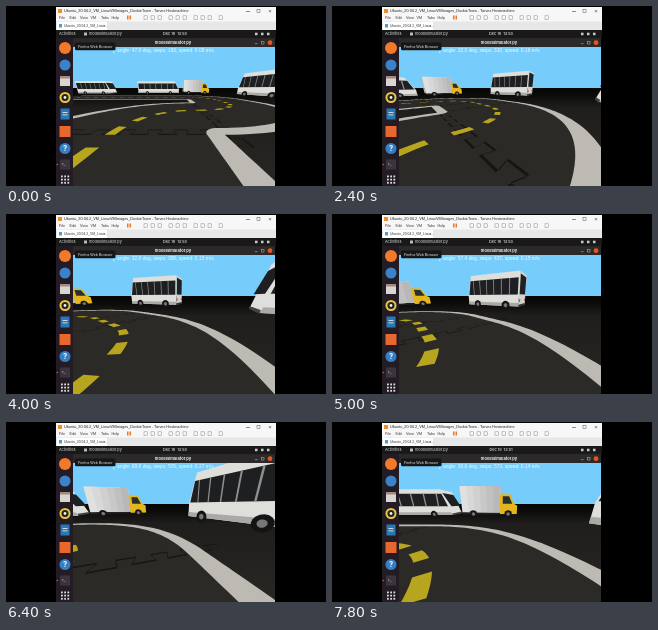
These frames come from a looping animation (320 px wide and 180 px high, 8 s). An HTML page with a canvas:

```html
<!DOCTYPE html>
<html lang="en">
<head>
<meta charset="utf-8">
<title>Driving simulator</title>
<style>
html, body { margin: 0; width: 100%; height: 100%; overflow: hidden; background: #000; }
canvas { display: block; width: 100vw; height: 100vh; }
</style>
</head>
<body>
<canvas></canvas>
<script>
const canvas = document.querySelector('canvas');
const c = canvas.getContext('2d');
const LOOP = 8000, STEP = 200;
const SANS = '"Liberation Sans", Arial, sans-serif';
const UI = 'Inter, "Open Sans", sans-serif';
const rad = deg => deg * Math.PI / 180;
const mix = (a, b, k) => a + (b - a) * k;

// World units are camera heights; headings turn clockwise from +z.
const FOCAL = 98, CENTER = { x: 168, y: 116 }, PITCH = rad(19.15), NEAR = 0.05;
const RADIUS = 2.6, EDGE = 2.4;

const drive = [
  { t: 0, x: 0, z: 0, yaw: 0 },
  { t: 1400, x: 0, z: 1, yaw: 3 },
  { t: 2400, x: 0.58, z: 2.32, yaw: 40 },
  { t: 3200, x: 1.42, z: 2.74, yaw: 60 },
  { t: 5000, x: 3.41, z: 4.37, yaw: 45 },
  { t: 6400, x: 5.03, z: 7.4, yaw: 20 },
  { t: 7800, x: 4.5, z: 9.2, yaw: 0 }
];

// x and z mark the middle of the rear bumper
const vehicles = [
  { draw: bus, x: -15, z: 17, heading: 90, length: 5, height: 2 },
  { draw: bus, x: -5.9, z: 18, heading: 90, length: 6.7, height: 2 },
  { draw: truck, x: 1.6, z: 18, heading: 90, length: 4.2, height: 2.2 },
  { draw: bus, x: 10.6, z: 9, heading: -18.6, length: 4.75, height: 2.6 },
  { draw: bus, x: 10.3, z: -1.5, heading: -12, length: 4.8, height: 2.6 }
];

let camera;

function cameraAt(t) {
  const i = Math.max(1, drive.findIndex(p => p.t >= t));
  const a = drive[i - 1], b = drive[i], k = (t - a.t) / (b.t - a.t);
  return {
    x: mix(a.x, b.x, k), z: mix(a.z, b.z, k), yaw: rad(mix(a.yaw, b.yaw, k)),
    speed: Math.hypot(b.x - a.x, b.z - a.z) / (b.t - a.t) * 108
  };
}

// World point to [right, down, depth]
function toCamera([x, y, z]) {
  const dx = x - camera.x, dz = z - camera.z;
  const sin = Math.sin(camera.yaw), cos = Math.cos(camera.yaw);
  const ahead = dx * sin + dz * cos;
  return [dx * cos - dz * sin,
    (1 - y) * Math.cos(PITCH) - ahead * Math.sin(PITCH),
    ahead * Math.cos(PITCH) + (1 - y) * Math.sin(PITCH)];
}

function clipNear(points) {
  return points.flatMap((p, i) => {
    const q = points[(i + 1) % points.length];
    const kept = p[2] >= NEAR ? [p] : [];
    if ((p[2] >= NEAR) !== (q[2] >= NEAR)) {
      const k = (NEAR - p[2]) / (q[2] - p[2]);
      kept.push(p.map((v, axis) => mix(v, q[axis], k)));
    }
    return kept;
  });
}

function worldPoly(points, color) {
  c.fillStyle = color;
  c.beginPath();
  for (const [x, y, depth] of clipNear(points.map(toCamera)))
    c.lineTo(CENTER.x + FOCAL * x / depth, CENTER.y + FOCAL * y / depth);
  c.closePath();
  c.fill();
}

// Follows [length, turn in degrees] pieces along the middle of the road
function buildTrack() {
  const arc = RADIUS * Math.PI / 2;
  const pieces = [[6, 0], [arc, 90], [arc, -90], [1.8, 0], [arc, -90], [14, 0]];
  const points = [], joints = [];
  let x = -1.45, z = -4, heading = 0;
  for (const [length, turn] of pieces) {
    const n = Math.round(length * 10);
    for (let i = 0; i < n; i++) {
      points.push({ x, z, heading });
      heading += rad(turn) / n / 2;
      x += Math.sin(heading) * length / n;
      z += Math.cos(heading) * length / n;
      heading += rad(turn) / n / 2;
    }
    joints.push({ x, z, heading });
  }
  return { points, joints };
}
const track = buildTrack();

const beside = (p, right, ahead = 0) => [
  p.x + Math.cos(p.heading) * right + Math.sin(p.heading) * ahead, 0,
  p.z - Math.sin(p.heading) * right + Math.cos(p.heading) * ahead];

function stripe(points, offset, width, color) {
  worldPoly([
    ...points.map(p => beside(p, offset - width / 2)),
    ...points.map(p => beside(p, offset + width / 2)).reverse()
  ], color);
}

// Interlocking edge between two floor tiles
function jigsaw(joint) {
  const line = [];
  for (let s = -RADIUS; s < RADIUS; s += 0.65)
    line.push([s, 0], [s + 0.22, 0], [s + 0.14, 0.25], [s + 0.51, 0.25], [s + 0.43, 0]);
  worldPoly([
    ...line.map(([s, a]) => beside(joint, s, a)),
    ...line.map(([s, a]) => beside(joint, s, a + 0.05)).reverse()
  ], '#161512');
}

function drawRoad() {
  const { points, joints } = track;
  stripe(points, 0, EDGE * 2, '#2b2a26');
  joints.forEach(jigsaw);
  for (const side of [-EDGE, EDGE]) stripe(points, side, 0.4, '#bdb9b3');
  for (let i = 0; i + 5 < points.length; i += 10)
    stripe(points.slice(i, i + 6), 0, 0.24, '#b7a41f');
}

// Local axes: along (rear to front), across (left to right), up; all 0 to 1
function vehicleFaces(v) {
  const sin = Math.sin(rad(v.heading)), cos = Math.cos(rad(v.heading)), width = 2;
  const place = (along, across, up) => {
    const a = along * v.length, b = (across - 0.5) * width;
    return [v.x + sin * a + cos * b, up * v.height, v.z + cos * a - sin * b];
  };
  const dx = camera.x - v.x, dz = camera.z - v.z;
  const right = dx * cos - dz * sin;
  const fill = map => (points, color) => worldPoly(points.map(p => map(...p)), color);
  const across = right > 0 ? 1 : 0;
  return {
    side: Math.abs(right) > width / 2 && fill((a, up) => place(a, across, up)),
    rear: dx * sin + dz * cos < 0 && fill((b, up) => place(0, b, up)),
    front: dx * sin + dz * cos > v.length &&
      fill((b, up) => place(1 - Math.max(0, up - 0.4) * 0.17, b, up))
  };
}

const box = (x0, y0, x1, y1) => [[x0, y0], [x1, y0], [x1, y1], [x0, y1]];

function wheel(face, x, aspect) {
  const ring = r => Array.from({ length: 16 }, (_, i) =>
    [x + Math.cos(i * Math.PI / 8) * r * aspect, 0.12 + Math.sin(i * Math.PI / 8) * r]);
  face(ring(0.13), '#141414');
  face(ring(0.06), '#777');
}

function bus(v) {
  const { side, rear, front } = vehicleFaces(v);
  const aspect = v.height / v.length;
  if (side) {
    side([[0, 0.1], [1, 0.1], [1, 0.4], [0.9, 1], [0, 1]], '#dededb');
    side([[0.02, 0.42], [0.98, 0.42], [0.92, 0.85], [0.02, 0.85]], '#1e1f20');
    for (let a = 0.15; a < 0.9; a += 0.14) side(box(a, 0.42, a + 0.015, 0.85), '#8f908e');
    side(box(0, 0.1, 1, 0.2), '#aaa9a5');
    for (const a of [0.22, 0.79]) wheel(side, a, aspect);
  }
  if (rear) {
    rear(box(0, 0.1, 1, 1), '#d1d1ce');
    rear(box(0.07, 0.43, 0.93, 0.94), '#202122');
    rear(box(0.05, 0.23, 0.2, 0.3), '#bd2e31');
    rear(box(0.8, 0.23, 0.95, 0.3), '#bd2e31');
    rear(box(0, 0.08, 1, 0.15), '#333');
  }
  if (front) {
    front(box(0, 0.1, 1, 1), '#dededb');
    front(box(0.05, 0.42, 0.95, 0.88), '#1e1f20');
    front(box(0, 0.08, 1, 0.15), '#444');
  }
}

function truck(v) {
  const { side, rear, front } = vehicleFaces(v);
  if (rear) rear(box(0, 0.18, 1, 1), '#b7b7b5');
  if (front) front(box(0.1, 0.12, 0.9, 0.75), '#d8ac1c');
  if (!side) return;
  side(box(0, 0.1, 0.98, 0.2), '#202020');
  for (let i = 0; i < 6; i++) {
    const gray = 224 - i * 8;
    side(box(i * 0.115, 0.18, 0.695, 1), `rgb(${gray},${gray},${gray})`);
  }
  side([[0.69, 0.12], [1, 0.12], [1, 0.4], [0.94, 0.46], [0.87, 0.76], [0.69, 0.76]], '#e5b51e');
  side([[0.74, 0.46], [0.91, 0.46], [0.85, 0.7], [0.74, 0.7]], '#292e31');
  for (const a of [0.2, 0.84]) wheel(side, a, v.height / v.length);
}

function rect(x, y, w, h, color) {
  c.fillStyle = color;
  c.fillRect(x, y, w, h);
}

function disc(x, y, r, color) {
  c.fillStyle = color;
  c.beginPath();
  c.arc(x, y, r, 0, 7);
  c.fill();
}

function text(str, x, y, size, color, font = UI, weight = 400, align = 'left') {
  c.font = `${weight} ${size}px ${font}`;
  c.fillStyle = color;
  c.textAlign = align;
  c.textBaseline = 'middle';
  c.fillText(str, x, y);
}

function drawScene(t) {
  camera = cameraAt(t);
  c.save();
  c.beginPath();
  c.rect(67, 41, 202, 139);
  c.clip();
  rect(67, 41, 202, 41, '#76cdfb');
  const ground = c.createLinearGradient(0, 82, 0, 180);
  ground.addColorStop(0, '#050505');
  ground.addColorStop(0.08, '#0c0c0b');
  ground.addColorStop(0.2, '#1f1e1c');
  ground.addColorStop(1, '#292724');
  rect(67, 82, 202, 98, ground);
  drawRoad();
  const distance = v => Math.hypot(v.x - camera.x, v.z - camera.z);
  [...vehicles].sort((a, b) => distance(b) - distance(a)).forEach(v => v.draw(v));
  const angle = 47 - 24 * Math.sin(Math.max(0, t - 1800) / 5600 * 2 * Math.PI);
  const steps = Math.round(193 + t * 0.0487);
  text(`], angle: ${angle.toFixed(1)} deg, steps: ${steps}, speed: ${camera.speed.toFixed(2)} m/s`,
    107, 44.2, 4.9, '#eefaff', SANS);
  c.restore();
}

function drawDock() {
  rect(50, 32, 17, 148, '#241c25');
  disc(59, 42, 6, '#f27a2a');
  disc(59, 59, 5.5, '#3b83c9');
  rect(54, 70, 10, 10, '#d9d6d2');
  rect(54, 70, 10, 2.5, '#a08a83');
  disc(59, 91.5, 5.5, '#e9c83c');
  disc(59, 91.5, 3.5, '#222');
  disc(59, 91.5, 1.4, '#eee');
  rect(54.5, 102.5, 9, 11, '#2878b5');
  rect(56.5, 106, 5, 0.8, '#eee');
  rect(56.5, 108.5, 5, 0.8, '#eee');
  rect(53.5, 120, 11, 11, '#e9662c');
  disc(59, 142.5, 5.5, '#347fc3');
  text('?', 59, 142.8, 7.5, '#fff', UI, 700, 'center');
  rect(54, 153.5, 10, 10, '#3b343c');
  text('>_', 55.5, 157.5, 3.5, '#eee');
  disc(51.3, 158.5, 0.8, '#e95420');
  for (let i = 0; i < 9; i++)
    rect(55 + i % 3 * 3.2, 169.5 + Math.floor(i / 3) * 3.2, 1.8, 1.8, '#ddd');
}

function drawWindows(t) {
  rect(50, 1, 220, 23, '#f7f7f7');
  rect(52, 3, 4, 4, '#e8912d');
  text('Ubuntu_20.04.2_VM_LinuxVMImages_DuckieTown - Tarvex Hostmachine', 58, 5.2, 3.8, '#222', SANS);
  rect(240, 5, 4, 0.6, '#444');
  c.lineWidth = 0.5;
  c.strokeStyle = '#555';
  c.strokeRect(251, 3.5, 3, 3);
  text('×', 264, 5, 6, '#444', SANS, 400, 'center');
  ['File', 'Edit', 'View', 'VM', 'Tabs', 'Help'].forEach((label, i) =>
    text(label, 53 + i * 10.5, 11.7, 3.7, '#333', SANS));
  rect(121, 9.5, 1.5, 4, '#e77828');
  rect(123.5, 9.5, 1.5, 4, '#e77828');
  c.strokeStyle = '#888';
  for (let i = 0; i < 10; i++) c.strokeRect(138 + i * 7 + Math.floor(i / 3) * 4, 9.8, 3.5, 3.5);
  rect(50, 15.5, 220, 8.5, '#e7e7e7');
  rect(51, 16, 50, 8, '#fff');
  rect(53, 18, 3, 3.5, '#4b9fc9');
  text('Ubuntu_20.04.2_VM_Linux...', 58, 20, 3.4, '#333', SANS);
  text('×', 97, 20, 4, '#555', SANS);
  rect(50, 24, 220, 8, '#191919');
  text('Activities', 53, 28.2, 3.8, '#ddd');
  rect(78, 26.5, 3, 3, '#b9b9b9');
  text('modelsimulator.py', 83, 28.2, 3.8, '#ddd');
  text(`Dec 19  ${t < 7000 ? '13:50' : '13:51'}`, 169, 28.2, 3.8, '#e5e5e5', UI, 500, 'center');
  for (const x of [249, 255, 261]) rect(x, 26.7, 2.5, 2.5, '#ccc');
  rect(67, 32, 202, 9, '#2b2929');
  text('modelsimulator.py', 167, 36.7, 4, '#eee', UI, 700, 'center');
  rect(249, 37.5, 2.5, 0.6, '#bbb');
  c.strokeStyle = '#bbb';
  c.strokeRect(255.5, 35.5, 2.5, 2.5);
  disc(264, 36.7, 2.4, '#e95420');
}

function drawTooltip() {
  c.fillStyle = '#171717';
  c.beginPath();
  c.roundRect(69, 36.5, 40.5, 7.8, 1.5);
  c.fill();
  text('Firefox Web Browser', 72, 40.5, 3.7, '#e5e5e5', SANS);
}

function frame(now) {
  const t = Math.floor(now % LOOP / STEP) * STEP;
  const w = Math.round(innerWidth * devicePixelRatio), h = Math.round(innerHeight * devicePixelRatio);
  if (canvas.width !== w || canvas.height !== h) {
    canvas.width = w;
    canvas.height = h;
  }
  c.setTransform(w / 320, 0, 0, h / 180, 0, 0);
  rect(0, 0, 320, 180, '#000');
  drawWindows(t);
  drawScene(t);
  drawDock();
  drawTooltip();
  requestAnimationFrame(frame);
}
requestAnimationFrame(frame);
</script>
</body>
</html>
```
